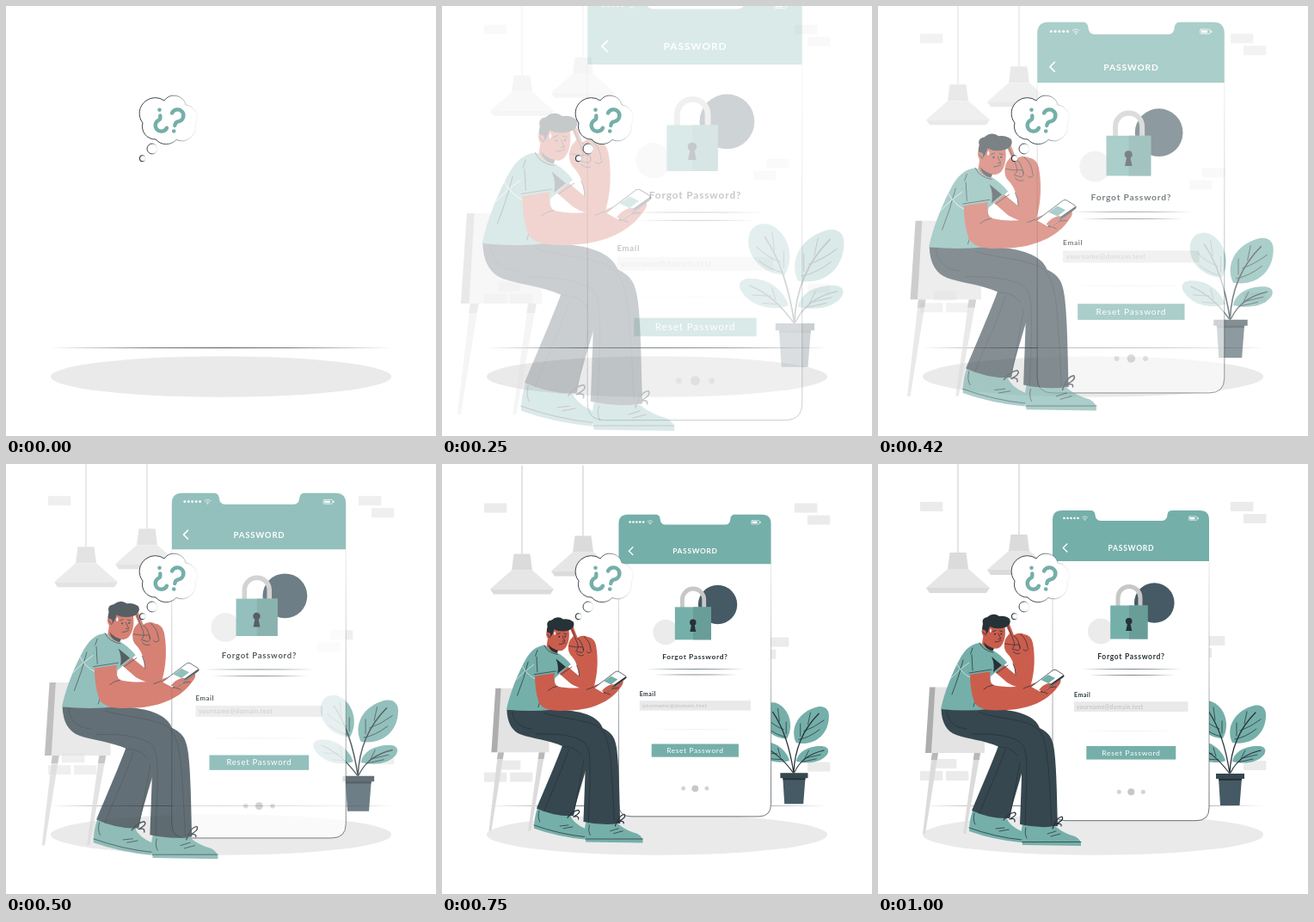
Animation of 500x500 px, one loop 1.04 s. Source, as an HTML page:

```html
<!DOCTYPE html>
<html lang="en">
<head>
<meta charset="utf-8">
<title>Forgot password</title>
<style>
  html, body { margin: 0; width: 100%; height: 100%; overflow: hidden; background: #fff; }
  svg { display: block; width: 100vw; height: 100vh; }
  text { font-family: Lato, "Open Sans", sans-serif; }
  .teal { fill: #75afa9; }
  .dark { fill: #263238; }
  .pants { fill: #37474f; }
  .skin { fill: #cb5d4d; }
  .slate { fill: #455a64; }
  .pale { fill: #ebebeb; }
  .grey { fill: #dbdbdb; }
  .white { fill: #fff; }
  .ink { fill: none; stroke: #263238; stroke-width: .75; stroke-linecap: round; stroke-linejoin: round; }
  .chalk { fill: none; stroke: #fff; stroke-width: .6; stroke-linecap: round; }
  .mark { fill: none; stroke: #75afa9; stroke-width: 4.4; stroke-linecap: round; stroke-linejoin: round; }
  .moving { opacity: 0; }
</style>
</head>
<body>
<svg viewBox="0 0 500 500">
  <defs>
    <linearGradient id="fade">
      <stop offset="0" stop-color="#263238" stop-opacity="0"/>
      <stop offset=".3" stop-color="#263238" stop-opacity=".8"/>
      <stop offset=".5" stop-color="#263238"/>
      <stop offset=".7" stop-color="#263238" stop-opacity=".8"/>
      <stop offset="1" stop-color="#263238" stop-opacity="0"/>
    </linearGradient>
    <linearGradient id="edge">
      <stop offset="0" stop-color="#263238"/>
      <stop offset=".4" stop-color="#263238"/>
      <stop offset=".8" stop-color="#263238" stop-opacity=".3"/>
      <stop offset="1" stop-color="#263238" stop-opacity=".05"/>
    </linearGradient>
    <linearGradient id="side" gradientUnits="userSpaceOnUse" x1="0" y1="113" x2="0" y2="415">
      <stop offset="0" stop-color="#263238" stop-opacity=".15"/>
      <stop offset=".4" stop-color="#263238" stop-opacity=".45"/>
      <stop offset="1" stop-color="#263238"/>
    </linearGradient>
  </defs>

  <ellipse cx="250" cy="431" rx="198" ry="23.8" fill="#eaeaea"/>
  <rect x="50" y="397.1" width="400" height=".8" fill="url(#fade)"/>

  <g class="moving" data-move="drop">
    <g id="bricks" class="pale"></g>
    <g id="lamps"></g>
  </g>

  <!-- plant -->
  <g class="moving" data-move="zoom" data-x="407" data-y="336">
    <path class="teal" d="M401 319C387 319 372 309 370 293C369 280 377 274 387 276C401 280 411 301 401 319Z"/>
    <path class="teal" d="M412 324C404 307 414 287 437 281C447 279 452 285 451 294C450 314 434 328 412 324Z"/>
    <path class="teal" d="M404 345C392 350 372 346 364 333C360 326 364 322 372 322C387 322 400 332 404 345Z"/>
    <path class="teal" d="M412 346C414 334 428 327 444 328C451 329 452 334 448 339C440 348 425 349 412 346Z"/>
    <g class="ink">
      <path d="M409 360C405 333 397 306 384 287M409 360C410 333 420 308 439 289" stroke-width="1.3"/>
      <path d="M408 359C397 344 386 334 371 328M410 359C416 346 427 337 445 333" stroke-width="1.1"/>
      <path d="M399 317Q387 314 379 307M397 308Q386 304 377 295M392 298L390 283M400 313L400 299"/>
      <path d="M415 320Q427 318 440 308M421 310Q433 306 445 297M417 316L417 301M426 302L429 288"/>
      <path d="M396 344L382 343M389 337L373 336M393 340L390 330M418 347L436 343M424 342L441 338M421 345L427 333"/>
    </g>
    <path class="slate" d="M396 365H423L420.5 397H398Z"/>
    <path class="pants" d="M393 360H426V366H393Z"/>
    <path class="dark" d="M396 366H423L422.8 368H396.2Z"/>
  </g>

  <!-- phone -->
  <g class="moving" data-move="zoom" data-x="294" data-y="234.5">
    <path class="white" d="M203 67H385V400Q385 414.7 370 414.7H218Q203 414.7 203 400Z"/>
    <path d="M203 113V400Q203 414.7 218 414.7H370Q385 414.7 385 400V113" fill="none" stroke="url(#side)" stroke-width=".7"/>
    <path class="teal" d="M203 113V65Q203 54 214 54H247Q252 54 252.5 59Q253 66 259 66H330Q336 66 336.5 59Q337 54 342 54H374Q385 54 385 65V113Z"/>
    <g id="signal" class="white"></g>
    <path class="chalk" d="M237.3 62.2Q240.5 59.4 243.7 62.2M238.7 63.7Q240.5 62 242.3 63.7"/>
    <circle class="white" cx="240.5" cy="65" r=".7"/>
    <rect class="chalk" x="361.5" y="61" width="9.5" height="4.4" rx=".8"/>
    <path class="white" d="M362.5 62H368.5V64.4H362.5ZM371.6 62.2H372.7V64.2H371.6Z"/>
    <path class="chalk" d="M219.8 93L215.3 97.5L219.8 102" style="stroke-width:1.4"/>
    <text x="294.4" y="100.7" text-anchor="middle" font-size="8.6" font-weight="700" letter-spacing=".72" fill="#fff">PASSWORD</text>

    <circle class="slate" cx="321.3" cy="161.5" r="23.3"/>
    <circle class="pale" cx="259" cy="194.5" r="15"/>
    <path d="M279 166V155.5a13 13 0 0 1 26 0V166" fill="none" stroke="#c7c7c7" stroke-width="5"/>
    <rect class="teal" x="270.2" y="164.5" width="43.3" height="39"/>
    <rect x="292" y="164.5" width="21.5" height="39" fill="#699d98"/>
    <circle class="dark" cx="291.7" cy="182.8" r="3.8"/>
    <path class="dark" d="M290.3 184H293.2L295.3 194H288.2Z"/>

    <text x="294.4" y="227" text-anchor="middle" font-size="8.6" font-weight="700" letter-spacing=".66" fill="#263238">Forgot Password?</text>
    <rect x="236" y="238.2" width="117" height=".6" fill="url(#fade)"/>
    <rect x="245" y="245" width="100" height=".6" fill="url(#fade)"/>
    <text x="228" y="271" font-size="7" font-weight="700" letter-spacing=".5" fill="#263238">Email</text>
    <rect x="228" y="276.3" width="132.6" height="11.7" fill="#e9e9e9"/>
    <text x="231" y="284.6" font-size="6.7" letter-spacing=".4" fill="#bdbdbd">yourname@domain.test</text>
    <rect x="238" y="310" width="112" height=".8" fill="url(#fade)" opacity=".08"/>
    <rect class="teal" x="242.3" y="328" width="104" height="15.6"/>
    <text x="294.4" y="338.7" text-anchor="middle" font-size="8.5" letter-spacing=".7" fill="#fff">Reset Password</text>
    <g fill="#d3d3d3">
      <circle cx="280.3" cy="381.2" r="2.5"/>
      <circle cx="294.3" cy="381.2" r="4" fill="#c7c7c7"/>
      <circle cx="308.3" cy="381.2" r="2.5"/>
    </g>
  </g>

  <!-- man on chair -->
  <g class="moving" data-move="zoom" data-x="144" data-y="309">
    <path class="grey" d="M63 336H70L55 430H52ZM112 336H119L102 430H99Z"/>
    <path d="M63 336H70L68.7 344H61.7ZM112 336H119L117.7 344H110.7Z" fill="#b8b8b8"/>
    <path d="M65 259.5H124V336H62Z" fill="#e3e3e3"/>
    <path d="M60 259.5H66.5L62 336H55Z" fill="#adadad"/>

    <!-- shoes and legs -->
    <path class="teal" d="M110 403L149 411Q153 421 167 427Q170 433 166 440Q134 437 106 427Q106 414 110 403Z"/>
    <path class="ink" d="M106 423Q137 434 167 437M137 424L147 423M141 427L152 425M112 406Q110 414 113 419"/>
    <path class="pants" d="M141 325C133 347 119 379 109 403Q131 413 153 412C157 390 170 355 174 330Z"/>
    <path class="ink" d="M148 332C140 356 127 383 118 406M166 342Q161 370 153 411"/>
    <path class="teal" d="M168 419L207 422Q217 430 229 433Q237 437 236 444L168 443Q165 431 168 419Z"/>
    <path class="ink" d="M167 439.500H236M197 430L207 427M201 433L212 430M172 423Q170 430 173 435"/>
    <path class="pants" d="M73.500 285C74 301 80 311 91 315C105 320 123 321 141 329C163 331 168 345 167 364L165 419Q188 424 209 421C208 394 208 357 205 333C203 319 200 313 188 307C184 296 172 291 160 288C150 286 140 285 127 284Z"/>
    <path class="ink" d="M80 287C81 298 88 307 103 308M118 289C139 296 163 296 180 304C198 312 198 345 202 420M109 314C133 313 154 316 165 323C175 331 172 349 173 365L171 420M141 329Q156 329 162 339"/>
    <path class="ink" d="M146 414Q152 406 159 405Q163 408 153 413Q160 411 159 416M203 424Q207 411 214 410Q217 414 206 419Q214 417 213 421" style="stroke-width:1.2"/>

    <!-- raised arm -->
    <path class="skin" d="M133 222L143 231L160 245C159 236 157 227 150 220C146 216 146 207 149 202L153 197L148 186L152 184L158 199Q164 195 170 198Q178 199 180 208C183 224 182 242 178 256C174 264 160 260 150 254L133 239Z"/>
    <path class="ink" d="M150 186L158 206Q160 211 157 214M158 200Q163 202 165 214M166 198Q173 203 174 214M148 209Q156 211 164 210Q167 214 163 217L156 215M157 218Q161 222 165 220M169 216Q172 219 175 215M160 245Q160 238 157 232M138 243L151 234"/>

    <!-- shirt -->
    <path class="teal" d="M119 208C108 209 102 215 96 225C86 243 77 266 73 285Q103 288 128 285L131 247L150 231Q143 222 134 217Z"/>
    <path class="dark" d="M132 224L144 234L134 242Q136 233 132 224Z"/>
    <path class="skin" d="M123 196L121 209Q127 218 134 217L137 204Z"/>
    <path class="dark" d="M123 207Q128 213 135 214L133 217.500Q124 215 123 207Z"/>
    <path class="ink" d="M118 208Q122 217 134 219M108 243Q104 227 110 214M99 228Q94 248 86 268M125 244L130 232M111 282L114 272"/>
    <path class="chalk" d="M92 233Q98 244 107 248M85 249Q95 238 106 231Q117 226 128 235"/>

    <!-- head -->
    <path class="skin" d="M124 188L147 187C149 196 148 206 143 212Q137 218 130 211L126 203Q119 199 121 191Z"/>
    <path class="dark" d="M125 199L128 195L130 189Q138 193 148 190Q156 186 153 180Q148 176 141 177Q134 172 127 178Q120 179 122 186Q120 193 123 193Q127 193 125 199Z"/>
    <path class="ink" d="M122 195L125 199M140 197Q142 202 143 203L140 203.500M133.500 195L137 193.500M141.500 194L145 195M136 207Q140 207 143 205" style="stroke-width:.8"/>
    <circle class="dark" cx="136" cy="197.800" r="1"/>
    <circle class="dark" cx="143.300" cy="197.500" r="1"/>
    <path class="white" d="M131 191Q133 195 130.500 196Q129 194 131 191Z"/>

    <!-- near arm with phone -->
    <path class="skin" d="M107 243L131 239C129 248 130 254 134 257C146 260 164 260 178 256L190 252L211 249Q215 252 209 259C198 275 176 285 150 286C132 287 118 287 112 277Q107 263 107 243Z"/>
    <path class="teal" d="M106 222L106 245L133 241L131 225Q117 214 106 222Z"/>
    <path class="ink" d="M106 243L132 239M109 222L110 240M134 257Q127 258 123 262M177 258L169 261M189 264L197 267M198 260L207 259"/>
    <path d="M178 259L203 240Q205 238.500 207 239.500L215 244.500Q217 246 215 248L194 264Q191 266 189 265Z" class="white"/>
    <path class="ink" d="M178 259L203 240Q205 238.500 207 239.500L215 244.500Q217 246 215 248L194 264Q191 266 189 265"/>
    <path class="ink" d="M190 264.500L215.500 246.500" style="stroke-width:1.8"/>
    <path class="teal" d="M189.500 251L198 245L206 249L198 255Z"/>
    <path class="skin" d="M187 263Q191 257 198 255Q204 254 200 258L193 265Z"/>
  </g>

  <!-- thought bubble -->
  <g fill="#fff" stroke="url(#edge)" stroke-width=".9">
    <path d="M159 136A18 18 0 0 1 163 110A18 18 0 0 1 184 110A14 14 0 0 1 209 115A15 15 0 0 1 220 138A16 16 0 0 1 198 155.500A16 16 0 0 1 174 155A15 15 0 0 1 159 136Z"/>
    <circle cx="170" cy="166" r="6"/>
    <circle cx="158.900" cy="177.200" r="3.400" stroke-width="1.1"/>
  </g>
  <path class="mark" d="M179.300 127.500V130Q179.300 131.800 177.800 132.400A7 7 0 1 0 187 141.800M193 124.500A7 7 0 1 1 201 134.200Q196.500 135 196.300 139"/>
  <circle class="teal" cx="178.500" cy="120.800" r="2.300"/>
  <circle class="teal" cx="195.200" cy="145.500" r="2.300"/>
</svg>

<script>
  const LOOP = 1040, FPS = 24, LAST = 24, HIDDEN = 3;
  const DROP = 30;
  const byId = id => document.getElementById(id);

  const bricks = [[49, 44], [410, 44], [425, 58], [377, 200], [362, 214],
                  [65, 343], [49, 357], [79, 357], [425, 345]];
  byId("bricks").innerHTML = bricks
    .map(([x, y]) => `<rect x="${x}" y="${y}" width="26.3" height="11"/>`).join("");

  // y is the top of the lamp's neck
  const lamp = (x, y) => `
    <path d="M${x} 0V${y}" stroke="#c9c9c9"/>
    <path class="grey" d="M${x - 9.5} ${y}h19l2.5 19h-24Z"/>
    <path fill="#e6e6e6" d="M${x - 12} ${y + 19}h24l25 22h-74Z"/>
    <path class="grey" d="M${x - 37} ${y + 41}h74l-4 6h-66Z"/>`;
  byId("lamps").innerHTML = lamp(164, 82) + lamp(93, 103);

  byId("signal").innerHTML = [0, 1, 2, 3, 4]
    .map(i => `<circle cx="${216.5 + i * 4}" cy="63" r="1.3"/>`).join("");

  const bezier = (a, b, s) => 3 * a * s * (1 - s) ** 2 + 3 * b * s * s * (1 - s) + s ** 3;

  // cubic-bezier(.36, -.01, .5, 1.38), solved by bisection
  function ease(x) {
    let lo = 0, hi = 1;
    for (let i = 0; i < 24; i++) {
      const mid = (lo + hi) / 2;
      if (bezier(.36, .5, mid) < x) lo = mid; else hi = mid;
    }
    return bezier(-.01, 1.38, (lo + hi) / 2);
  }

  const moves = {
    drop: p => `translate(0 ${-DROP * (1 - p)})`,
    zoom: (p, { x, y }) => `translate(${x} ${y}) scale(${1.5 - p / 2}) translate(${-x} ${-y})`
  };
  const parts = [...document.querySelectorAll(".moving")];

  function draw(time) {
    const step = Math.min(LAST, Math.floor((time % LOOP + 5) * FPS / 1000));
    const p = step < HIDDEN ? 0 : ease(Math.min(1, (step + .4) / LAST));
    for (const part of parts) {
      part.style.opacity = Math.min(1, Math.max(0, p));
      part.setAttribute("transform", moves[part.dataset.move](p, part.dataset));
    }
  }

  const start = performance.now();
  function tick() {
    draw(performance.now() - start);
    requestAnimationFrame(tick);
  }
  tick();
</script>
</body>
</html>
```
